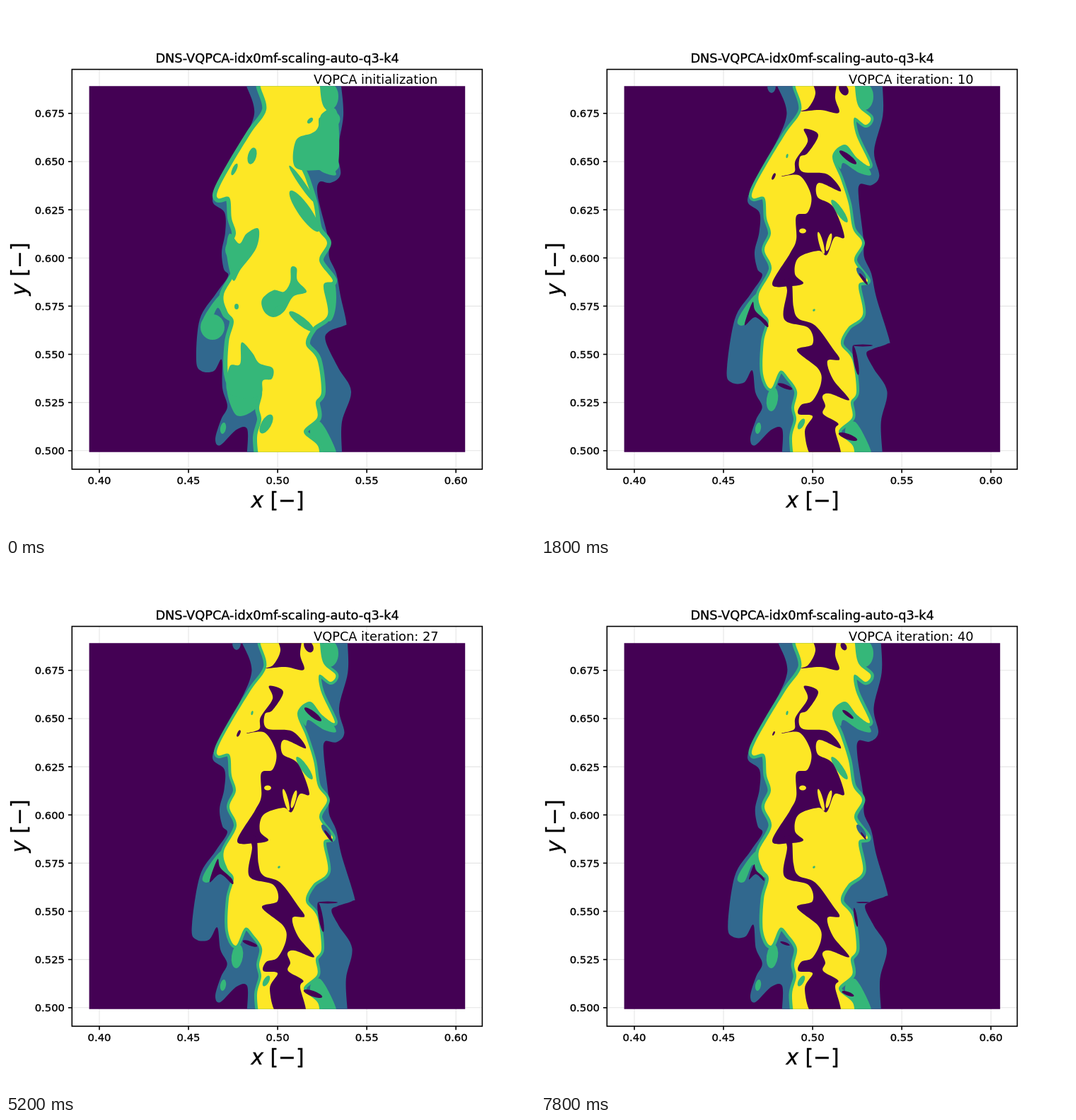
Write an HTML page that moves like this. It is 748 by 748 pixels and loops after 8 s.

```html
<!DOCTYPE html>
<html lang="en">
<head>
<meta charset="utf-8">
<title>VQPCA clustering</title>
<style>
html, body { margin: 0; width: 100%; height: 100%; overflow: hidden; background: #fff; }
svg { display: block; width: 100%; height: 100%; font-family: "DejaVu Sans", Verdana, sans-serif; }
.b { stroke: #000; stroke-width: .35; }
</style>
</head>
<body>
<svg id="stage" viewBox="0 0 748 748" xmlns="http://www.w3.org/2000/svg">
  <clipPath id="box"><rect x="117.6" y="113.2" width="531.6" height="517.6"/></clipPath>
  <g id="grid" stroke="#e5e5e5" stroke-width="1.1"></g>
  <g id="field" clip-path="url(#box)">
    <rect x="117" y="113" width="533" height="518" fill="#440154"/>
  </g>
  <rect x="93.3" y="89.6" width="580.1" height="565.4" fill="none" stroke="#000" stroke-width="1.6"/>
  <g id="ticks" stroke="#000" stroke-width="1.6"></g>
  <g id="labels" class="b" font-size="14.8"></g>
  <text class="b" x="383.6" y="80" font-size="17.8" text-anchor="middle">DNS-VQPCA-idx0mf-scaling-auto-q3-k4</text>
  <text id="note" x="435" y="110" font-size="17.8"></text>
  <text class="b" x="384" y="708.5" font-size="29.7" text-anchor="middle"><tspan font-style="italic">x</tspan> [−]</text>
  <text class="b" transform="translate(28.5 372) rotate(-90)" font-size="29.7" text-anchor="middle"><tspan font-style="italic">y</tspan> [−]</text>
</svg>
<script>
const $ = id => document.getElementById(id);
const NS = "http://www.w3.org/2000/svg";
const PURPLE = "#440154", BLUE = "#31688e", GREEN = "#35b779", YELLOW = "#fde725";
const STEP = 200, COUNT = 40;

function add(parent, tag, attrs, text) {
  const el = document.createElementNS(NS, tag);
  for (const k in attrs) el.setAttribute(k, attrs[k]);
  if (text) el.textContent = text;
  parent.appendChild(el);
  return el;
}

// Axes
const line = (p, x1, y1, x2, y2) => add(p, "line", { x1, y1, x2, y2 });
for (let i = 0; i < 5; i++) {
  const x = 132 + i * 126.05;
  line($("grid"), x, 90, x, 655);
  line($("ticks"), x, 655, x, 660.3);
  add($("labels"), "text", { x, y: 676.3, "text-anchor": "middle" }, (.4 + i * .05).toFixed(2));
}
for (let i = 0; i < 8; i++) {
  const y = 628.8 - i * 68.14;
  line($("grid"), 93, y, 674, y);
  line($("ticks"), 88, y, 93, y);
  add($("labels"), "text", { x: 83, y: y + 5.4, "text-anchor": "end" }, (.5 + i * .025).toFixed(3));
}

// Smooth curves through key points
const points = s => s.trim().split(/\s+/).map(p => p.split(",").map(Number));
function curve(p, closed) {
  const n = p.length, at = i => closed ? p[(i + n) % n] : p[Math.max(0, Math.min(n - 1, i))];
  let d = "" + p[0];
  for (let i = 0; i < (closed ? n : n - 1); i++) {
    const [a, b, c, e] = [at(i - 1), at(i), at(i + 1), at(i + 2)];
    const out = k => (b[k] + (c[k] - a[k]) / 6).toFixed(1);
    const into = k => (c[k] - (e[k] - b[k]) / 6).toFixed(1);
    d += `C${out(0)},${out(1)} ${into(0)},${into(1)} ${c}`;
  }
  return d;
}
const band = (l, r) => `M${curve(l)}L${curve([...r].reverse())}Z`;

// Shapes that scale about their centre; size(n) gives the scale at iteration n
const shapes = [];
function shape(fill, size, spec) {
  let x, y, rot = 0, el;
  if (typeof spec === "string") {
    const p = points(spec), mean = k => p.reduce((s, q) => s + q[k], 0) / p.length;
    [x, y] = [mean(0), mean(1)];
    el = add($("field"), "path", { fill, d: `M${curve(p.map(q => [q[0] - x, q[1] - y]), true)}Z` });
  } else {
    let rx, ry;
    [x, y, rx, ry, rot = 0] = spec;
    el = add($("field"), "ellipse", { fill, rx, ry });
  }
  shapes.push({ el, size, x, y, rot });
}
const group = (fill, size, ...specs) => specs.forEach(s => shape(fill, size, s));

const always = () => 1;
const clustered = n => n > 1 ? 1 : 0;
const leftover = floor => n => Math.max(floor, 1 - (n - 1) * .13);
const gap = n => n < 2 ? 0 : n < 5 ? .5 : n < 34 ? 1 : .65;

// Outer region, which swells around a few heights: [y, spread, dx, dy]
const leftEdge = points(`340,113 351,153 328,203 308,238 292,275 309,292 310,320 305,348 308,372
314,382 296,408 274,443 269,500 276,516 294,516 305,500 306,540 313,566 304,585 296,612 303,621
326,599 341,598 341,631`);
const rightEdge = points(`474,113 477,155 469,205 473,238 459,250 443,249 441,270 456,330 457,355
467,378 473,410 481,446 478,452 457,460 452,474 470,512 488,545 475,588 475,631`);
const leftSwell = [[113, 40, -6, 0], [350, 25, -3, 0], [510, 22, -7, 17]];
const rightSwell = [[113, 50, 9, 0], [262, 22, 9, 4], [455, 22, 12, 26], [620, 40, 8, 0]];
const swell = (edge, bumps, w) => edge.map(([x, y]) => bumps.reduce(([u, v], [y0, s, dx, dy]) => {
  const g = w * Math.exp(-(((y - y0) / s) ** 2) / 2);
  return [u + dx * g, v + dy * g];
}, [x, y]).map(v => +v.toFixed(1)));
const progress = n => (1 - Math.exp(-(((n - 1) / 4) ** 2))) * (1 - .25 * (Math.max(0, n - 28) / 12) ** 2);
const outer = add($("field"), "path", { fill: BLUE });
shape(BLUE, n => n > 5 && n < 36 ? 1 : 0, [326, 113, 6, 10]);

// Green lobes outside the jet
group(GREEN, always, "278,449 282,436 300,411 314,405 318,442 308,440 299,427 288,450",
  "430,600 444,588 463,620 466,640 440,640", "412,205 430,192 452,214 467,238 450,236 428,222 423,230",
  [327, 556, 8, 17, 8], [457, 128, 13, 19], [307, 597, 4, 8, 10]);
group(GREEN, leftover(0), [292, 454, 17, 18], [457, 412, 10, 34], "314,535 325,578 352,570 358,545");

// Yellow jet with a green rim
const jet = band(points(`358,100 360,115 368,147 346,180 318,226 300,260 300,272 316,271 319,300
325,322 316,345 326,372 308,408 313,432 322,446 315,475 314,520 325,541 338,516 350,526 362,545
358,568 361,585 355,610 358,645`),
points(`444,100 444,115 449,142 466,158 459,168 443,158 446,183 465,225 447,215 430,196 412,212
424,245 435,280 441,315 454,335 443,360 462,388 449,395 455,436 434,455 424,478 440,500 446,545
438,560 440,582 421,602 441,622 443,645`));
const rim = add($("field"), "path", { d: jet, fill: GREEN, stroke: GREEN, "stroke-linejoin": "round" });
add($("field"), "path", { d: jet, fill: YELLOW });

// Green patches that shrink while the clusters settle
group(GREEN, leftover(0),
  "333,476 348,490 358,505 377,512 376,527 363,530 361,548 340,555 313,545 316,510 331,506",
  "362,415 378,402 393,404 402,390 403,370 411,371 412,388 425,404 406,411 393,432 378,440 365,432",
  "316,322 330,336 340,322 357,315 354,342 332,372 321,388 312,350",
  "447,152 468,150 469,228 445,232 409,228 410,190 432,180 441,172",
  [418, 446, 22, 6, 38], [419, 252, 32, 4, 55], [323, 231, 9, 3, 115], [430, 162, 5, 3, 135], [326, 425, 3, 4]);
group(GREEN, leftover(.25), [348, 212, 12, 6, 105], [386, 430, 8, 6, 140]);
group(GREEN, leftover(.55), [422, 290, 35, 9, 55], [368, 591, 15, 7, 120]);

// Inner core
group(PURPLE, clustered,
  "384,100 388,124 378,144 367,149 395,147 421,151 416,130 416,100",
  `372,174 392,182 377,208 366,214 369,234 405,238 424,262 393,250 391,270 413,284 429,326 415,327
404,352 392,346 364,356 359,379 371,392 352,396 327,393 352,350 361,330 361,297 377,292 382,268
366,240 340,241 358,235 360,218 377,192`,
  `342,388 354,388 357,425 364,442 388,452 413,485 422,500 405,502 413,528 436,557 408,548 398,552
402,565 399,577 420,590 416,600 423,640 385,640 373,602 384,580 364,577 368,564 384,558 396,533
392,513 362,487 384,478 378,455 344,443 348,402`);
group(YELLOW, clustered, [396, 335, 3, 16, 165], [407, 334, 3, 13, 15], [370, 318, 5, 3.5]);

// Thin gaps between the clusters
group(BLUE, clustered, [453, 379, 11, 4, 55]);
group(PURPLE, gap, "299,419 303,431 319,446 320,454 303,440 288,451", [434, 214, 15, 4, 38], [329, 241, 2, 5, 25],
  [428, 118, 6, 9, 150], [445, 501, 3, 21, 170], [455, 480, 14, 1.5], [345, 538, 11, 3, 20],
  [434, 609, 14, 4, 20], [456, 386, 10, 2, 55]);

let shown = 0;
function draw(ms) {
  const n = Math.floor(ms / STEP) % COUNT + 1;
  if (n === shown) return;
  shown = n;
  const w = progress(n);
  outer.setAttribute("d", band(swell(leftEdge, leftSwell, w), swell(rightEdge, rightSwell, w)));
  rim.setAttribute("stroke-width", 12 - 4 * w);
  for (const { el, size, x, y, rot } of shapes) {
    const s = size(n);
    el.style.display = s > 0 ? "" : "none";
    el.setAttribute("transform", `translate(${x} ${y}) scale(${s}) rotate(${rot})`);
  }
  $("note").textContent = n === 1 ? "VQPCA initialization" : "VQPCA iteration: " + n;
}
const start = performance.now();
function tick() {
  draw(performance.now() - start);
  requestAnimationFrame(tick);
}
tick();
</script>
</body>
</html>
```
